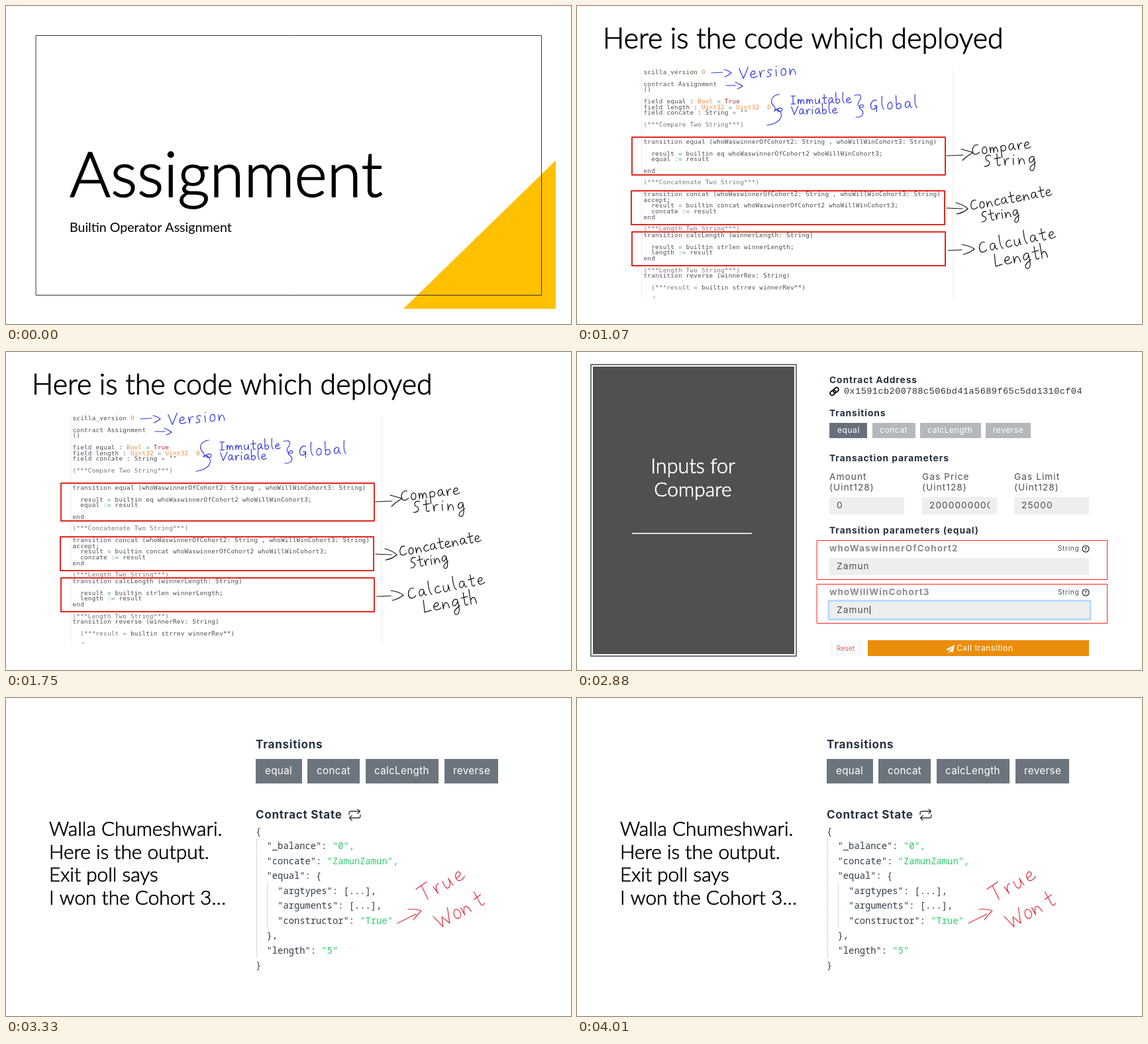
Recreate the animation shown at these times as an HTML page with a canvas. Size 853 by 480 pixels, loop 4460 ms.

```html
<!DOCTYPE html>
<html lang="en">
<head>
<meta charset="utf-8">
<title>Assignment slides</title>
<style>
  html, body { margin: 0; width: 100%; height: 100%; overflow: hidden; background: #fff; }
  canvas { display: block; }
</style>
</head>
<body>
<canvas id="stage" width="853" height="480"></canvas>
<script>
const ctx = document.getElementById('stage').getContext('2d');

const LATO = 'Lato, "Open Sans", sans-serif';
const INTER = 'Inter, "Open Sans", sans-serif';
const style = (weight, size, family, track = 0, edge = 0) =>
  ({ font: `${weight} ${size}px ${family}`, track, edge });
// A light face with slightly thickened stems.
const light = size => style(300, size, LATO, 0, 0.25 + size * 0.015);

const S = {
  sub: style(400, 19.6, LATO),
  code: style(400, 9.3, '"DejaVu Sans Mono", monospace', 0.23),
  json: style(400, 13.8, '"Noto Sans Mono", monospace'),
  hash: style(400, 13.5, '"Liberation Mono", monospace', 0.47),
  head: style(700, 13.8, INTER, 0.9),
  field: style(700, 13.5, INTER, 1.1),
  body: style(400, 13.6, INTER, 1.1),
  button: style(400, 12.1, INTER, 0.5),
  hint: style(400, 10, INTER, 0.7),
  small: style(400, 10, INTER, 0.2),
  head2: style(700, 17, INTER, 0.75),
  button2: style(400, 15.2, INTER, 0.35)
};

function text(str, x, y, st, color = '#000', align = 'left') {
  ctx.font = st.font;
  ctx.letterSpacing = st.track + 'px';
  ctx.textAlign = align;
  ctx.fillStyle = ctx.strokeStyle = color;
  ctx.fillText(str, x, y);
  if (st.edge) {
    ctx.lineWidth = st.edge;
    ctx.strokeText(str, x, y);
  }
  return ctx.measureText(str).width;
}

// Draws [text, color] pieces one after another.
function runs(parts, x, y, st) {
  for (const [str, color] of parts) x += text(str, x, y, st, color);
}

function box(x, y, w, h, color) {
  ctx.fillStyle = color;
  ctx.fillRect(x, y, w, h);
}

function frame(x, y, w, h, color, width = 1) {
  ctx.strokeStyle = color;
  ctx.lineWidth = width;
  ctx.strokeRect(x, y, w, h);
}

function stroke(d, color, width = 1) {
  ctx.strokeStyle = color;
  ctx.lineWidth = width;
  ctx.stroke(new Path2D(d));
}

function fill(d, color) {
  ctx.fillStyle = color;
  ctx.fill(new Path2D(d));
}

function guide(x, y1, y2, color, dash) {
  ctx.setLineDash(dash);
  stroke(`M${x} ${y1}V${y2}`, color);
  ctx.setLineDash([]);
}

// Pen alphabet: stroke on a grid with the baseline at 0, and advance.
const PEN = {
  a: ['M8-9C4-12 0-8 1-3C2 1 7-1 8-8C8-4 8 0 11-1', 11],
  b: ['M1-20L1-1C4 2 9-1 8-5C7-9 3-8 1-5', 10],
  c: ['M8-9C4-12 0-6 1-3C2 1 6 0 9-2', 9],
  e: ['M1-5C6-4 9-7 7-9C4-12 0-6 1-3C2 1 7 0 10-2', 10],
  g: ['M8-9C4-12 0-7 1-3C2 0 7-2 8-8C9 0 9 8 5 10C1 11 0 6 4 3L10-1', 11],
  h: ['M1-20L1 0M1-5C4-11 8-9 8 0', 10],
  i: ['M2-9L2 0M3-14L3-13', 5],
  l: ['M2-20C1-12 1-2 4 0', 5],
  m: ['M1-9L1 0C2-9 6-12 6 0C7-10 12-11 12 0', 14],
  n: ['M1-9L1 0C3-9 8-12 9 0', 11],
  o: ['M6-10C1-11-1 0 4 0C9 0 10-9 5-10', 10],
  p: ['M1-8L1 9M1-6C4-12 10-8 8-3C7 0 3 0 1-2', 10],
  r: ['M1-9L2 0C2-6 4-10 8-9', 8],
  s: ['M8-9C3-12 0-7 4-5C8-3 6 1 0 0', 9],
  t: ['M4-17L4-2C4 0 6 1 8-1M0-10L9-11', 9],
  u: ['M1-9C0-2 1 1 4 0C7-1 8-5 8-9L9 0', 11],
  C: ['M10-14C4-17 0-9 1-4C2 1 8 0 11-3', 12],
  G: ['M10-14C4-17 0-9 1-4C2 1 8 0 10-6L6-6M10-6L9 3', 13],
  I: ['M0-15L8-15M4-15L4 0M0 0L8 0', 10],
  L: ['M2-16L1 0L10-1', 11],
  S: ['M10-15C3-18 0-10 5-8C10-6 8 1 0 0', 11],
  T: ['M0-16L14-17M7-16L6 0', 13],
  V: ['M0-15L5 0L13-16', 12],
  W: ['M0-15L4 0L8-10L12 0L18-16', 19],
  ' ': ['', 6]
};

function write(word, x, y, scale, angle, gap, color) {
  ctx.save();
  ctx.translate(x, y);
  ctx.rotate(angle);
  ctx.scale(scale, scale);
  for (const ch of word) {
    const [d, advance] = PEN[ch];
    stroke(d, color, 1.2 / scale);
    ctx.translate(advance + gap, 0);
  }
  ctx.restore();
}

function titleSlide() {
  fill('M830 233V457H600Z', '#ffc000');
  frame(45.5, 44.5, 763, 392, '#333');
  text('Assignment', 96, 288, light(94.5));
  text('Builtin Operator Assignment', 96, 341, S.sub);
}

const TOKEN = /(\bBool\b|\bUint32\b|\b0$|\bTrue\b|:=|=|^(?:field|transition|contract|end)\b)/;

function tokenColor(t) {
  if (/^(Bool|Uint32|0)$/.test(t)) return '#f08a3c';
  if (t === 'True') return '#a0322d';
  if (t === '=' || t === ':=') return '#4a98a8';
  if (/^(field|transition|contract|end)$/.test(t)) return '#5d4a66';
  return t.startsWith('(***') || t.startsWith('  (***') ? '#777' : '#4b4b4e';
}

function codeLine(line, y) {
  runs(line.split(TOKEN).map(t => [t, tokenColor(t)]), 100.5, y, S.code);
}

function codeBlock(y, lines) {
  lines.forEach((line, i) => line && codeLine(line, y + i * 8.75));
}

function codeSlide() {
  const blue = '#3038d8', red = '#e3261f', ink = '#111';
  text('Here is the code which deployed', 39, 64, light(42.8));

  guide(97.5, 96, 440, '#e2e2e2', [1, 2]);
  guide(567.5, 96, 440, '#e2e2e2', [1, 2]);
  codeBlock(103, ['scilla_version 0', '', 'contract Assignment', '()', '',
    'field equal : Bool = True', 'field length : Uint32 = Uint32  0',
    'field concate : String = ""', '', '(***Compare Two String***)']);
  codeBlock(208, ['transition equal (whoWaswinnerOfCohort2: String , whoWillWinCohort3: String)', '',
    '  result = builtin eq whoWaswinnerOfCohort2 whoWillWinCohort3;',
    '  equal := result', '', 'end', '', '(***Concatenate Two String***)', '',
    'transition concat (whoWaswinnerOfCohort2: String , whoWillWinCohort3: String)',
    'accept;', '  result = builtin concat whoWaswinnerOfCohort2 whoWillWinCohort3;',
    '  concate := result', 'end', '', '(***Length Two String***)']);
  box(98, 340, 468, 52, '#fff');
  codeBlock(349, ['transition calcLength (winnerLength: String)', '',
    '  result = builtin strlen winnerLength;', '  length := result', 'end', '',
    '(***Length Two String***)', 'transition reverse (winnerRev: String)', '',
    '  (***result = builtin strrev winnerRev**)']);
  box(115, 439, 3, 1, '#888');

  frame(83, 198, 473, 57, red, 2);
  frame(82, 279, 473, 51, red, 2);
  frame(83, 341, 473, 51, red, 2);

  stroke('M203 101L220 100M222 96Q230 98 233 101Q228 105 223 107', blue, 1.15);
  stroke('M225 120L240 120M239 115Q246 118 250 121Q246 124 242 125', blue, 1.15);
  stroke('M306 133C290 136 292 147 298 152C302 157 295 160 299 158C303 153 311 153 310 157C308 162 300 158 302 156C314 161 310 177 287 180', blue, 1.15);
  stroke('M419 135C432 131 429 140 425 145C421 152 432 156 433 151C431 146 424 152 427 155C435 160 433 168 421 168', blue, 1.15);
  write('Version', 246, 110, 1.05, -0.08, 2.9, blue);
  write('Immutable', 323, 148, 0.8, -0.02, 2.5, blue);
  write('Variable', 324, 164, 0.8, -0.03, 2.1, blue);
  write('Global', 443, 157, 1, -0.05, 3.5, blue);

  stroke('M558 226L583 225M580 216Q590 219 598 221Q588 227 582 233', ink, 1.15);
  stroke('M558 305L582 306M572 297Q584 300 590 306Q584 312 573 314', ink, 1.15);
  stroke('M560 369L581 368M581 360Q594 362 600 367Q592 373 583 375', ink, 1.15);
  write('Compare', 597, 225, 1, -0.12, 2.3, ink);
  write('String', 615, 242, 1.05, -0.06, 4, ink);
  write('Concatenate', 595, 308, 0.95, -0.18, 1.8, ink);
  write('String', 611, 326, 0.95, -0.17, 1.3, ink);
  write('Calculate', 608, 373, 1.05, -0.2, 3.6, ink);
  write('Length', 631, 393, 1.15, -0.17, 2, ink);
}

function chainIcon(x, y) {
  ctx.save();
  ctx.translate(x, y);
  ctx.rotate(-Math.PI / 4.6);
  ctx.beginPath();
  ctx.roundRect(-7.5, -3, 9, 6, 3);
  ctx.roundRect(-1.5, -3, 9, 6, 3);
  ctx.strokeStyle = '#111';
  ctx.lineWidth = 1.9;
  ctx.stroke();
  ctx.restore();
}

// Returns the x where the typed value ends.
function paramField(label, value, y) {
  text(label, 381, y, S.field, '#8a8c90');
  text('String', 726, y - 1, S.hint, '#444c55');
  ctx.beginPath();
  ctx.arc(768, y - 4, 5, 0, Math.PI * 2);
  ctx.strokeStyle = '#222';
  ctx.lineWidth = 1.2;
  ctx.stroke();
  text('?', 768, y - 1, style(600, 8, INTER), '#222', 'center');
  frame(362.5, y - 16.5, 438, 59, '#f22');
  box(381, y + 10, 392, 26, '#eee');
  return 392 + text(value, 392, y + 27, S.body, '#495057');
}

function inputsSlide() {
  const dark = '#24313f', grey = '#495057';
  frame(21, 19, 310, 440, '#747474', 2);
  box(24, 22, 304, 434, '#505050');
  text('Inputs for', 175, 183, light(30.6), '#fff', 'center');
  text('Compare', 175, 218, light(30), '#fff', 'center');
  box(83, 273, 181, 1.6, '#fff');

  text('Contract Address', 381, 47, S.head, dark);
  chainIcon(388.5, 59.5);
  text('0x1591cb200788c506bd41a5689f65c5dd1310cf04', 403, 63, S.hash, '#333');

  text('Transitions', 381, 97, S.head, dark);
  [['equal', 381, 57, 393], ['concat', 446, 65, 457], ['calcLength', 518, 92, 529], ['reverse', 617, 68, 628]]
    .forEach(([name, x, w, tx], i) => {
      box(x, 107, w, 23, i ? '#b4b8bc' : '#686f7c');
      text(name, tx, 122, S.button, '#fff');
    });

  text('Transaction parameters', 381, 165, S.head, dark);
  [['Amount', '0', 381], ['Gas Price', '2000000000', 521], ['Gas Limit', '25000', 660]]
    .forEach(([name, value, x]) => {
      text(name, x, 193, S.body, grey);
      text('(Uint128)', x, 209, S.body, grey);
      box(x, 219, 113, 26, '#eee');
      ctx.save();
      ctx.beginPath();
      ctx.rect(x, 219, 102.5, 26);
      ctx.clip();
      text(value, x + 11, 236, S.body, grey);
      ctx.restore();
    });

  text('Transition parameters (equal)', 381, 274, S.head, dark);
  paramField('whoWaswinnerOfCohort2', 'Zamun', 301);
  const caret = paramField('whoWillWinCohort3', 'Zamun', 367);
  frame(380, 375.5, 395, 28, '#b9dbfb', 3);
  box(Math.round(caret), 383, 1, 13, '#222');

  box(381, 435, 51, 24, '#f8f9fa');
  text('Reset', 392, 451, S.small, '#e2605f');
  box(439, 435, 334, 24, '#eb8d0c');
  fill('M570 442L557 449L560.5 450.5L567.5 444.5L562 451.5L567.5 453.5ZM561.5 452L563.5 453L561.5 455Z', '#fff');
  text('Call transition', 573, 451, S.button, '#fff');
}

const STATE = ['{', '  "_balance": "0",', '  "concate": "ZamunZamun",', '  "equal": {',
  '    "argtypes": [...],', '    "arguments": [...],', '    "constructor": "True"',
  '  },', '  "length": "5"', '}'];

function outputSlide() {
  const dark = '#24313f', red = '#dd2a3c';
  ['Walla Chumeshwari.', 'Here is the output.', 'Exit poll says', 'I won the Cohort 3…']
    .forEach((line, i) => text(line, 65, 208 + i * 34.7, light(29.8)));

  text('Transitions', 377, 76, S.head2, dark);
  [['equal', 377, 70, 391], ['concat', 455, 79, 469], ['calcLength', 543, 110, 556], ['reverse', 662, 81, 675]]
    .forEach(([name, x, w, tx]) => {
      box(x, 92, w, 37, '#6c757d');
      text(name, tx, 115, S.button2, '#fff');
    });

  text('Contract State', 377, 182, S.head2, dark);
  stroke('M518 176V174Q518 171 521 171H534M531 168L534.5 171L531 174.5M535 176V178Q535 181 532 181H519M522 177.5L518.5 181L522 184.5', '#333', 1.3);

  guide(378.5, 213, 393, '#c4c4c4', [2, 2]);
  guide(394.5, 280, 347, '#c4c4c4', [2, 2]);
  STATE.forEach((line, i) => {
    const [, key, value] = line.match(/^(.*?)((?<=: )".*)?$/);
    runs([[key, '#303c48'], [value || '', '#2fca6c']], 377, 205.5 + i * 22.5, S.json);
  });

  stroke('M591 340Q605 333 619 326M607 319Q618 318 627 321Q620 328 615 335', red, 1.15);
  write('True', 630, 308, 1.4, -0.52, 3.5, red);
  write('Won t', 655, 348, 1.4, -0.5, 0.3, red);
}

const SLIDES = [[1070, titleSlide], [2200, codeSlide], [3330, inputsSlide], [4460, outputSlide]];
const LOOP = 4460;

function draw() {
  const t = performance.now() % LOOP;
  box(0, 0, 853, 480, '#fff');
  ctx.lineCap = ctx.lineJoin = 'round';
  SLIDES.find(([end]) => t < end)[1]();
  requestAnimationFrame(draw);
}
draw();
</script>
</body>
</html>
```
